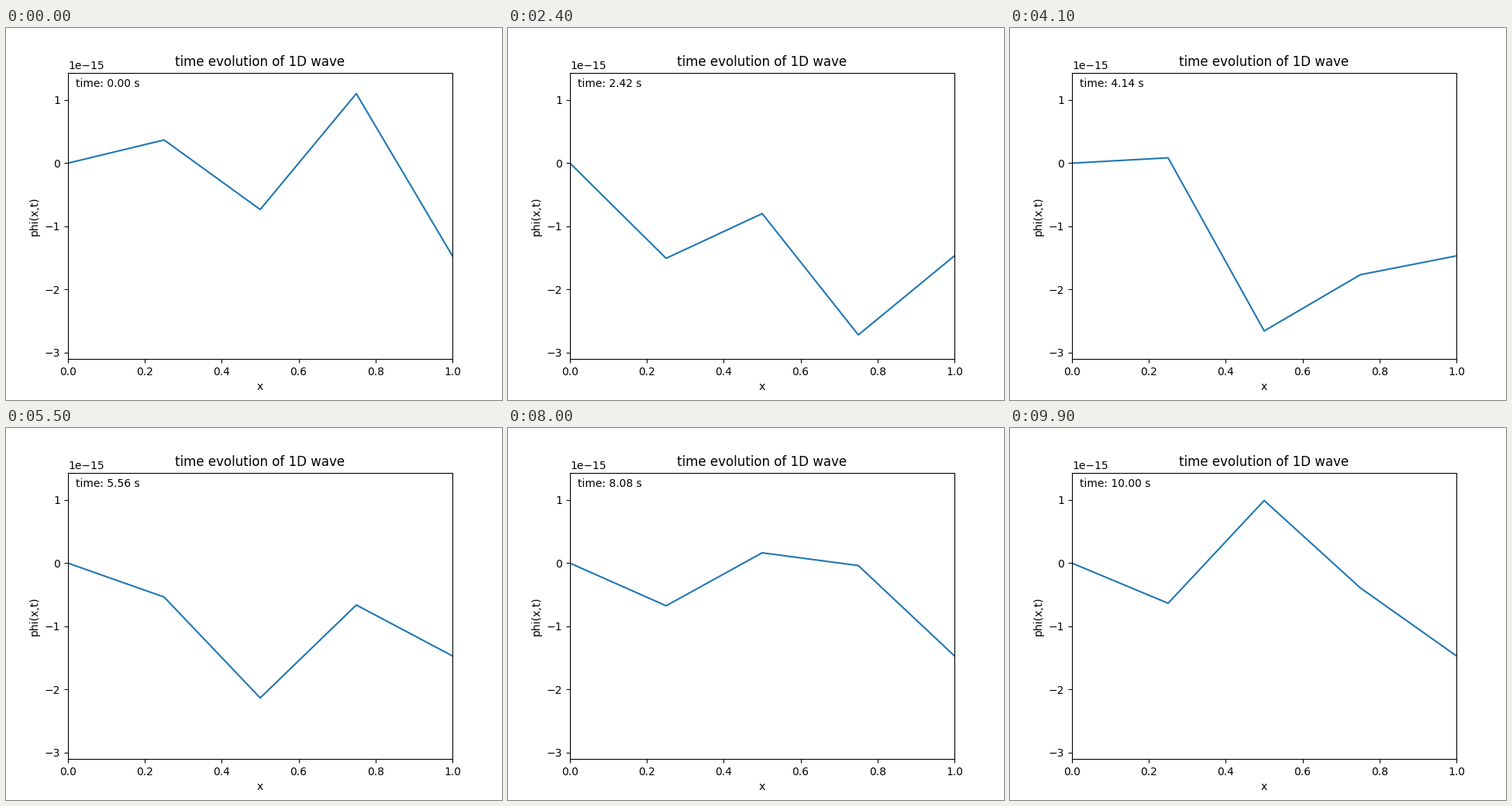
These frames come from a looping animation (640x480 px, 10 s). A matplotlib script:

```python
import numpy as np
import matplotlib.pyplot as plt
from matplotlib.animation import FuncAnimation

FRAMES = 100
STIFFNESS = 24.5  # (wave speed / grid spacing) squared

x = np.linspace(0, 1, 5)
times = np.linspace(0, 10, FRAMES)
dt = times[1] - times[0]


def rate(state):
    """Time derivative of (phi, velocity) with both ends held fixed."""
    phi, vel = state
    acc = np.zeros_like(phi)
    acc[1:-1] = STIFFNESS * (phi[2:] - 2 * phi[1:-1] + phi[:-2])
    return np.array([vel, acc])


def rk4_step(state):
    k1 = rate(state)
    k2 = rate(state + dt / 2 * k1)
    k3 = rate(state + dt / 2 * k2)
    k4 = rate(state + dt * k3)
    return state + dt / 6 * (k1 + 2 * k2 + 2 * k3 + k4)


def solve():
    # The grid samples the sine at its nodes, so only round-off remains.
    state = np.array([np.sin(12 * np.pi * x), np.zeros_like(x)])
    history = [state[0]]
    for _ in times[1:]:
        state = rk4_step(state)
        history.append(state[0])
    return np.array(history)


waves = solve()

fig, ax = plt.subplots(figsize=(6.4, 4.8), dpi=100)
ax.set_xlim(0, 1)
ax.set_ylim(waves.min(), waves.max())
ax.set_title("time evolution of 1D wave")
ax.set_xlabel("x")
ax.set_ylabel("phi(x,t)")
line, = ax.plot(x, waves[0])
label = ax.text(0.02, 0.95, "", transform=ax.transAxes)


def update(i):
    line.set_ydata(waves[i])
    label.set_text(f"time: {times[i]:.2f} s")
    return line, label


anim = FuncAnimation(fig, update, frames=FRAMES, interval=100, repeat=True,
                     repeat_delay=0, blit=False)
plt.show()
```
